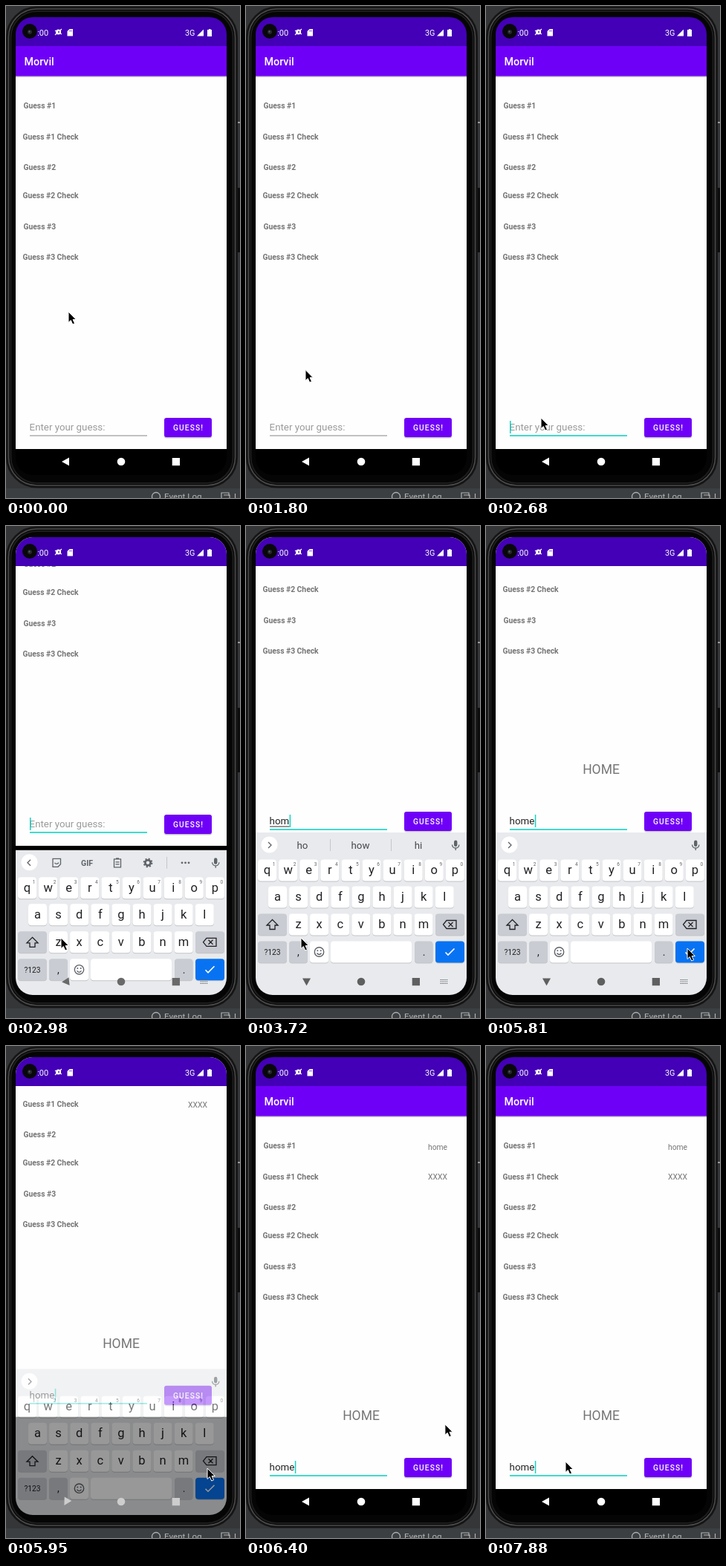
Write an HTML page that moves like this. It is 315 by 663 pixels and loops after 8 s.

```html
<!DOCTYPE html>
<html lang="en">
<head>
<meta charset="utf-8">
<title>Guessing game</title>
<style>
html, body { margin: 0; width: 100%; height: 100%; overflow: hidden; background: #343638; }
svg { display: block; width: 315px; height: 663px; font-family: Roboto, sans-serif; }
</style>
</head>
<body>
<svg id="stage" viewBox="0 0 315 663"></svg>
<script>
const LOOP = 8000;
const PURPLE = '#6f00f8', TEAL = '#12d3c4', GREY = '#757575', INK = '#202124', ICON = '#5f6368';

const rect = (x, y, w, h, fill, rx = 0, more = '') =>
  `<rect x="${x}" y="${y}" width="${w}" height="${h}" rx="${rx}" fill="${fill}" ${more}/>`;
const circle = (x, y, r, fill, more = '') => `<circle cx="${x}" cy="${y}" r="${r}" fill="${fill}" ${more}/>`;
const path = (d, fill, more = '') => `<path d="${d}" fill="${fill}" ${more}/>`;
const line = (d, color = ICON, width = 1.3) => path(d, 'none', `stroke="${color}" stroke-width="${width}"`);
const group = (id, body, more = '') => `<g id="${id}" ${more}>${body}</g>`;
// y is the middle of the capital letters
const text = (s, x, y, size, fill, more = '') =>
  `<text x="${x}" y="${y + size * 0.36}" font-size="${size}" fill="${fill}" ${more}>${s}</text>`;
const centred = (s, x, y, size, fill, more = '') => text(s, x, y, size, fill, 'text-anchor="middle" ' + more);

function phone() {
  return rect(0, 0, 315, 663, '#343638') + rect(0, 650, 315, 13, '#3c3f41')
    + circle(202, 661, 5.5, 'none', 'stroke="#afb1b3" stroke-width="1.3"')
    + text('Event Log', 213, 661, 11.6, '#b4b6b8')
    + line('M300 660V656H290V665M293 659H301V666', '#afb1b3', 1.2) + text('L', 307, 661, 11.6, '#b4b6b8')
    + rect(311, 245, 4, 87, '#0c0c0c', 1) + rect(312, 156, 3, 2, '#999')
    + rect(1.5, 2, 309, 646, '#050505', 40, 'stroke="#151515" stroke-width="3"')
    + rect(3.5, 4, 305, 642, 'none', 38, 'stroke="#4c4c4c" stroke-width="1.6"')
    + rect(6.5, 7, 299, 636, 'none', 35, 'stroke="#1d1d1d" stroke-width="2"');
}

function app() {
  const labels = [134, 176, 217, 255, 297, 338].map((y, i) =>
    text(`Guess #${(i >> 1) + 1}${i % 2 ? ' Check' : ''}`, i % 2 ? 22.5 : 23.5, y, 10.3, GREY, 'font-weight="700"'));
  return rect(13, 54, 284, 543, '#fefefe')
    + rect(13, 94, 284, 2, '#00000030') + rect(13, 54, 284, 40.5, PURPLE)
    + text('Morvil', 24.5, 75, 14.3, '#fff', 'font-weight="500"')
    + labels.join('')
    + group('result', centred('home', 258, 136.5, 10.3, GREY) + centred('XXXX', 258, 176.5, 10.3, GREY)
      + centred('HOME', 155, 498, 17.5, GREY))
    + text('Enter your guess:', 31.6, 567.5, 13.3, '#9a9a9a', 'id="hint"')
    + text('', 31.6, 567.5, 13.3, '#222', 'id="typed"')
    + rect(32, 574.5, 0, 1, '#333', 0, 'id="composing"')
    + rect(32, 578.5, 158, 1, '#858585', 0, 'id="underline"')
    + rect(32, 559, 1.5, 17, TEAL, 0, 'id="caret"')
    + rect(213, 556.5, 64, 26, '#00000038', 3) + rect(213, 555, 64, 26, PURPLE, 3)
    + `<g clip-path="url(#button)">${circle(255, 567, 1, '#fff', 'id="ripple"')}</g>`
    + centred('GUESS!', 245.5, 568.3, 10.2, '#fff', 'font-weight="500" letter-spacing="1.1"');
}

function statusBar() {
  return rect(13, 15, 284, 39, '#4300b6')
    + text('1:00', 36, 36, 11, '#fff')
    + circle(32, 34, 10, '#08080a') + circle(32, 35, 3, '#23262c') + circle(31.5, 34.5, 1, '#667')
    + circle(70.5, 35, 3.6, '#fff') + line('M66 39L75 31M66 33L75 38', '#fff', 1.3) + circle(71, 35, 1, '#4300b6')
    + path('M82.500 34L85.500 31H90V40.500H82.500Z', '#fff') + line('M86 32.500V34.500M88 32.500V34.500', '#4300b6', .8)
    + text('3G', 241, 36, 10.8, '#fff')
    + path('M257 40.500H266V31.500Z', '#fff') + path('M271 32H273V31H275.500V32H277V41H271Z', '#fff');
}

function keyboard() {
  const cap = (x, y, w, fill = '#fff') => rect(x, y - 13.5, w, 29, '#0000002b', 4) + rect(x, y - 14.5, w, 29, fill, 4);
  const letter = (s, x, y) => cap(x - 12.5, y, 25)
    + `<text x="${x}" y="${y + 5}" font-size="16.5" fill="${INK}" text-anchor="middle">${s}</text>`;
  const row = (s, x, y) => [...s].map((c, i) => letter(c, x + i * 28.1, y)).join('');
  const digits = [...'1234567890'].map((c, i) => centred(c, 37.5 + i * 28.1, 455.5, 6.5, ICON)).join('');
  const special = '#c9ccd2';
  const tools = line('M33 426L29 430L33 434')
    + line('M63 424.500H73.500V432L70 435.500H63ZM65.500 430Q68 433 71 430')
    + centred('GIF', 109, 430, 10.5, ICON, 'font-weight="700"')
    + line('M145.500 425H154.500V436H145.500ZM148 424H152M147.500 429H152.500M147.500 432H152.500')
    + circle(191, 430, 3.6, 'none', `stroke="${ICON}" stroke-width="2.6"`)
    + circle(191, 430, 5.4, 'none', `stroke="${ICON}" stroke-width="2" stroke-dasharray="2.1 2.14"`)
    + line('M216.500 422V438', '#c4c7cb', 1) + [237, 241.5, 246].map(x => circle(x, 430, 1.4, ICON)).join('');
  const house = x => path(`M${x - 7} 430L${x} 423L${x + 7} 430Z`, '#c8432f')
    + rect(x - 5, 429.5, 10, 7, '#e9c79a') + rect(x - 1, 431.5, 3, 5, '#79502f');
  const suggestions = line('M113.500 422V438M195.500 422V438', '#c4c7cb', 1)
    + centred('', 76, 430, 13.3, '#44474b', 'id="word0"') + centred('', 154, 430, 13.3, '#44474b', 'id="word1"')
    + centred('', 232, 430, 13.3, '#44474b', 'id="word2"')
    + group('houses', line('M232.500 422V438', '#c4c7cb', 1) + house(214) + house(249)
      + circle(256, 432, 3.3, '#4f9a3a') + rect(242, 436, 16, 1.5, '#6fae4a'));
  return rect(13, 413, 284, 265, '#e8eaed')
    + circle(31.5, 429.5, 11, '#fff')
    + group('tools', tools) + group('more', line('M30 426L34 430L30 434')) + group('suggestions', suggestions)
    + rect(280, 423.5, 4.4, 8.5, ICON, 2.2) + line('M277.500 429.500Q278 434 282.200 434Q286.400 434 286.900 429.500M282.200 434V437')
    + row('qwertyuiop', 28.5, 464) + digits + row('asdfghjkl', 42.5, 500) + row('zxcvbnm', 70.5, 537)
    + cap(16, 537, 39, special) + line('M35.500 530.500L43 538H39V543.500H32V538H28Z', INK)
    + cap(255, 537, 39, special) + line('M270 531.500H283V542.500H270L265.500 537ZM272.500 534L278.500 540M278.500 534L272.500 540', INK)
    + cap(16, 574, 39, special) + centred('?123', 35.5, 574, 10.3, INK)
    + cap(58, 574, 25, special) + centred(',', 70.5, 574, 14, INK)
    + cap(86, 574, 25) + circle(98.5, 574, 6.2, 'none', `stroke="${ICON}" stroke-width="1.4"`)
    + circle(96.3, 572.3, 1, ICON) + circle(100.7, 572.3, 1, ICON) + line('M95.500 575.500Q98.500 579.500 101.500 575.500')
    + cap(114, 574, 109) + cap(227, 574, 24.5, special) + centred('.', 239.5, 574, 14, INK)
    + cap(255, 574, 39, '#0873f2') + line('M268.500 574.500L272 578L280.500 569.500', '#fff', 1.6);
}

function navigation() {
  const dots = [611.5, 614, 616.5].map(y => `M261.5 ${y}H271.5`).join('');
  return path('M75 614L85 608.500V619.500Z', 'inherit', 'id="back"').replace('fill="inherit"', '')
    + '<circle cx="155" cy="614" r="5.3"/><rect x="223.700" y="609" width="10.300" height="10.300"/>'
    + path(dots, 'none', `id="imeIcon" stroke="${ICON}" stroke-width="1.2" stroke-dasharray="1.300 .800"`);
}

const stage = document.getElementById('stage');
stage.innerHTML = `<defs><clipPath id="screen">${rect(13, 15, 284, 617, '#fff', 23)}</clipPath>
  <clipPath id="button">${rect(213, 555, 64, 26, '#fff', 3)}</clipPath></defs>`
  + phone()
  + `<g clip-path="url(#screen)">${rect(13, 15, 284, 617, '#000')}`
  + group('app', app()) + statusBar() + group('keyboard', keyboard()) + group('nav', navigation()) + '</g>'
  + group('pointer', path('M0 0V14.500L3.300 11.500L5.700 17L8.500 15.800L6.100 10.500H10.300Z', '#000',
    'stroke="#fff" stroke-width="1" stroke-linejoin="round"'));

const $ = id => document.getElementById(id);
const set = (id, attrs) => { for (const k in attrs) $(id).setAttribute(k, attrs[k]); };
const show = (id, on) => set(id, { visibility: on ? 'visible' : 'hidden' });

// Linear track of [time, value...] keys
function track(t, keys) {
  const i = keys.findIndex(k => k[0] > t);
  if (i === 0) return keys[0].slice(1);
  if (i < 0) return keys[keys.length - 1].slice(1);
  const a = keys[i - 1], b = keys[i], p = (t - a[0]) / (b[0] - a[0]);
  return a.slice(1).map((v, j) => v + (b[j + 1] - v) * p);
}

const pointerKeys = [
  [0, 84, 412], [70, 84, 412], [150, 94, 412], [1680, 94, 412], [1800, 80, 490], [1950, 76, 538], [2250, 74, 555],
  [4200, 74, 555], [4470, 190, 470], [4620, 303, 425], [4770, 255, 396], [4900, 255, 396], [5060, 266, 520],
  [5400, 271, 569], [6150, 271, 569], [6400, 268, 511], [6690, 238, 142], [6880, 238, 142], [7150, 205, 250],
  [7500, 125, 470], [7800, 107, 560]];
const panKeys = [[2850, 0], [2980, -166], [3060, -170], [5850, -170], [5950, -98], [6080, 0]];
// Keyboard offset, its opacity, grey of the navigation icons, turn of the back arrow
const keyboardKeys = [
  [2850, 70, 0, 255, 0], [2930, 40, 1, 150, 0], [2980, 24, 1, 105, -5], [3100, 0, 1, 95, -90],
  [5880, 0, 1, 95, -90], [5950, 22, .6, 205, -60], [6060, 44, 0, 255, 0]];
const keyTimes = [3350, 3500, 3700, 4150];
const widths = [0, 7.4, 14.9, 26.6, 33.8];
const suggestionSets = [[3450, 'ho', 'how', 'hi'], [3860, 'hom', 'home', 'how'], [4300, 'home', 'hone', '']];
const CLICK = 4850;

function draw(t) {
  const [x, y] = track(t, pointerKeys);
  const [pan] = track(t, panKeys);
  const [drop, alpha, grey, turn] = track(t, keyboardKeys);
  const between = (a, b) => t >= a && t < b;
  const focused = t >= 2680;
  const count = keyTimes.filter(k => t >= k).length;

  set('pointer', { transform: `translate(${x} ${y})` });
  set('app', { transform: `translate(0 ${pan})` });
  set('keyboard', { transform: `translate(0 ${drop})`, opacity: alpha });
  set('nav', { fill: `rgb(${grey},${grey},${grey})` });
  set('back', { transform: `rotate(${turn} 81 613.500)` });
  set('imeIcon', { opacity: between(2820, 5900) ? 1 : 0 });

  $('typed').textContent = 'home'.slice(0, count);
  show('hint', !count);
  set('composing', { width: t < 5700 ? widths[count] : 0 });
  set('underline', focused ? { fill: TEAL, height: 1.6, y: 578.2 } : { fill: '#858585', height: 1, y: 578.5 });
  set('caret', { x: 32 + widths[count] });
  show('caret', focused && !between(4670, 5170) && !between(7000, 7440));

  const ripple = (t - CLICK) / 450;
  set('ripple', { r: Math.max(0, Math.min(60, ripple * 110)), opacity: ripple > 0 && ripple < 1 ? .25 * Math.min(1, 2 - 2 * ripple) : 0 });
  show('result', t >= CLICK + 60);

  const words = suggestionSets.filter(s => t >= s[0]).pop();
  show('tools', !count);
  show('more', count);
  show('suggestions', words && t < 5750);
  show('houses', between(4300, 5750));
  if (words) words.slice(1).forEach((w, i) => { $('word' + i).textContent = w; });
}

const start = performance.now();
function frame() {
  draw((performance.now() - start) % LOOP);
  requestAnimationFrame(frame);
}
frame();
</script>
</body>
</html>
```
